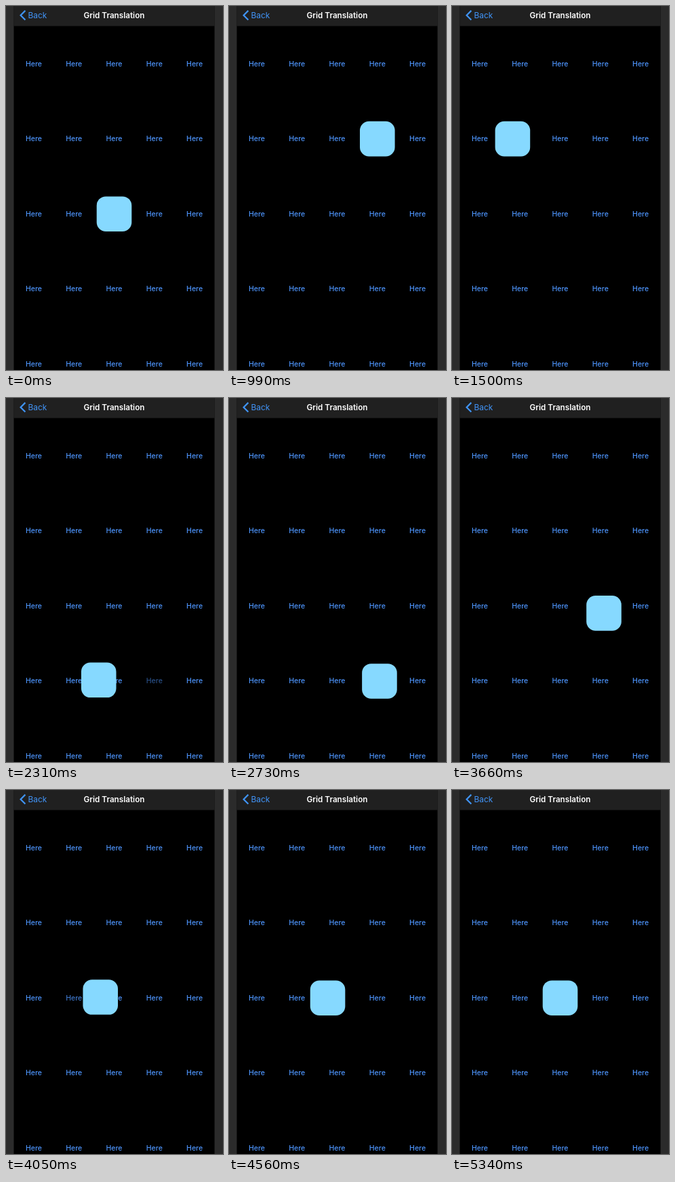
An HTML page for the animation above (5.37 s loop, 320 by 536 pixels).

```html
<!DOCTYPE html>
<html lang="en">
<head>
<meta charset="utf-8">
<title>Grid Translation</title>
<style>
  html, body { margin: 0; width: 100%; height: 100%; overflow: hidden; background: #000; }
  svg { display: block; width: 100vw; height: 100vh; }
  text { font-family: Inter, Roboto, "Liberation Sans", sans-serif; }
  .title { font-size: 11.7px; font-weight: 600; fill: #fff; text-anchor: middle; }
  .back { font-size: 11.9px; fill: #4094f8; }
  .cell { font-size: 10.5px; font-weight: 500; fill: #4c92f8; text-anchor: middle; }
</style>
</head>
<body>
<svg viewBox="0 0 320 536">
  <rect width="320" height="536" fill="#000"/>
  <rect x="11.5" width="296" height="29.5" fill="#202020"/>
  <rect width="11.5" height="536" fill="#2b2b2b"/>
  <rect x="307.5" width="12.5" height="536" fill="#2b2b2b"/>
  <path d="M28.4 6.9 L21.6 13.7 L28.4 20.5" fill="none" stroke="#4094f8" stroke-width="2.2"/>
  <text class="back" x="32.6" y="18">Back</text>
  <text class="title" x="159.5" y="18">Grid Translation</text>
  <g id="grid"></g>
  <rect id="box" x="-25.8" y="-25.8" width="51.6" height="51.6" rx="13.5" fill="#86d9ff"/>
</svg>
<script>
  const LOOP = 5370, STEP = 30;
  const colX = c => 40.9 + 59.3 * c;
  const rowY = r => 85.1 + 110.55 * r;

  // Taps: time in ms, column, row
  const START = [2, 2];
  const TAPS = [
    [70, 3, 1], [1130, 1, 1], [1680, 1, 3], [2225, 3, 3], [2949, 2, 1],
    [3362, 3, 2], [3900, 1, 2], [4393, 2, 2]
  ];

  // Step response of an underdamped spring
  const DAMPING = 0.6, OMEGA = 2 * Math.PI / 0.55;
  const DECAY = DAMPING * OMEGA, FREQ = OMEGA * Math.sqrt(1 - DAMPING ** 2);
  function spring(ms) {
    if (ms <= 0) return 0;
    const t = ms / 1000, a = FREQ * t;
    return 1 - Math.exp(-DECAY * t) * (Math.cos(a) + DECAY / FREQ * Math.sin(a));
  }

  // Label opacity around a tap: held down, then fading back
  const PRESS = 60, FADE = 200, DIM = 0.2;
  function labelOpacity(ms) {
    if (ms < -PRESS || ms > FADE) return 1;
    return DIM + (1 - DIM) * Math.max(0, ms) / FADE;
  }

  const grid = document.getElementById("grid");
  const box = document.getElementById("box");
  const labels = [];
  for (let r = 0; r < 5; r++) {
    for (let c = 0; c < 5; c++) {
      const label = document.createElementNS("http://www.w3.org/2000/svg", "text");
      label.setAttribute("class", "cell");
      label.setAttribute("x", colX(c));
      label.setAttribute("y", rowY(r) + 3.6);
      label.textContent = "Here";
      grid.append(label);
      labels.push(label);
    }
  }

  function draw(t) {
    let [c, r] = START, [lastC, lastR] = START;
    const opacity = new Array(25).fill(1);
    for (const [at, toC, toR] of TAPS) {
      const p = spring(t - at), i = toR * 5 + toC;
      c += (toC - lastC) * p;
      r += (toR - lastR) * p;
      [lastC, lastR] = [toC, toR];
      opacity[i] = Math.min(opacity[i], labelOpacity(t - at));
    }
    box.setAttribute("transform", `translate(${colX(c)} ${rowY(r)})`);
    labels.forEach((label, i) => label.setAttribute("opacity", opacity[i]));
  }

  const begin = performance.now();
  function tick() {
    const t = (performance.now() - begin) % LOOP;
    draw(Math.floor(t / STEP) * STEP);
    requestAnimationFrame(tick);
  }
  tick();
</script>
</body>
</html>
```
